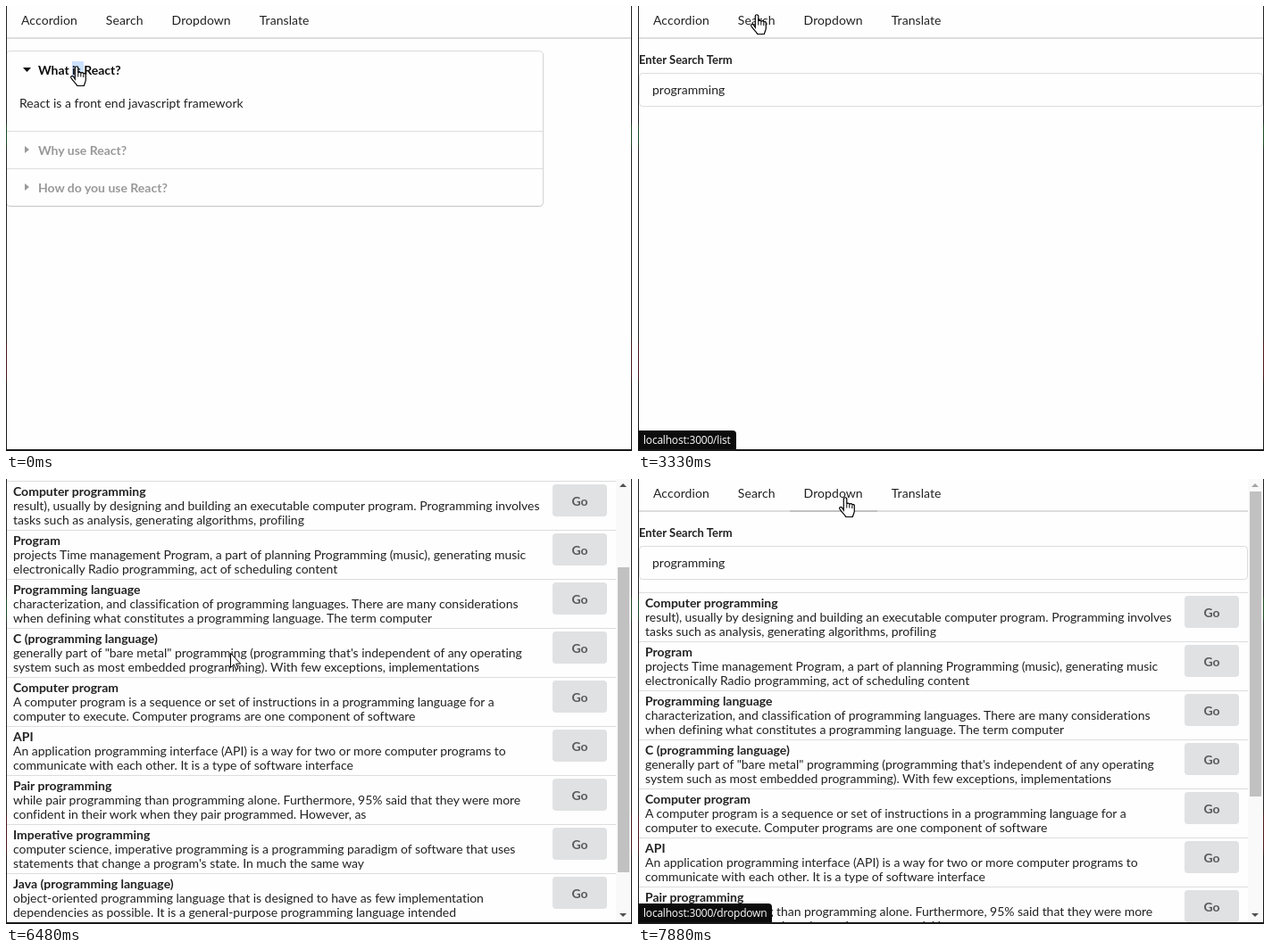
An HTML page for the animation above (8000 ms loop, 701 by 499 pixels).

```html
<!DOCTYPE html>
<html lang="en">
<head>
<meta charset="utf-8">
<title>React widgets</title>
<style>
  * { box-sizing: border-box; }
  html, body { margin: 0; width: 100%; height: 100%; overflow: hidden; }
  body {
    position: relative; color: rgba(0,0,0,.87); font: 14px/20px Lato, sans-serif;
    background: linear-gradient(#222 130px, #1d4a22 135px 155px, #222 162px 370px, #4a1a1a 380px 415px, #181818 425px);
  }
  #view { position: absolute; left: 1px; top: 0; width: 699px; height: 497px; overflow: hidden; background: #fefefe; }
  #page { position: absolute; inset: 0; }
  #page.narrow { right: 17px; }
  nav { position: absolute; top: -3px; width: 100%; height: 40px; display: flex; border-bottom: 2px solid rgba(34,36,38,.15); }
  nav a { height: 40px; padding: 12px 16px; line-height: 14px; letter-spacing: .08px; border-bottom: 2px solid transparent; }
  nav a.pressed { border-color: rgba(34,36,38,.15); }

  #accordion {
    position: absolute; top: 51px; width: 600px; border-radius: 4px;
    box-shadow: 0 1px 2px rgba(34,36,38,.15), 0 0 0 1px rgba(34,36,38,.15);
  }
  .title { position: relative; height: 42px; padding-left: 35px; border-top: 1px solid rgba(34,36,38,.15); font-weight: 700; line-height: 41px; color: rgba(0,0,0,.4); }
  .title:first-child { height: 41px; border: 0; }
  .title::before {
    content: ""; position: absolute; left: 20px; top: 16px; width: 5px; height: 8px;
    background: currentColor; clip-path: polygon(0 0, 100% 50%, 0 100%);
  }
  .title.hover { color: rgba(0,0,0,.87); }
  .title.open { color: rgba(0,0,0,.95); }
  .title.open::before { left: 18px; top: 18px; width: 9px; height: 5px; clip-path: polygon(0 0, 100% 0, 50% 100%); }
  .content { display: none; padding: 7px 14px 21px; }
  .open + .content { display: block; }
  #selection { position: absolute; left: 73px; top: 62px; width: 13px; height: 20px; background: #cce2ff; }

  #search label { position: absolute; top: 50px; font-size: 13px; font-weight: 700; }
  #input { position: absolute; top: 75px; width: 100%; height: 38px; padding: 8px 14px; border: 1px solid rgba(34,36,38,.15); border-radius: 4px; }
  #results { position: absolute; top: 127px; width: 100%; }
  .item {
    position: relative; height: 55px; padding: 3px 7px; border-top: 1px solid rgba(34,36,38,.15);
    line-height: 16px; letter-spacing: -.035px; white-space: pre;
  }
  .item b { letter-spacing: 0; }
  .item button {
    position: absolute; left: 611px; top: 3px; width: 61px; height: 36px; padding: 0; border: 0; border-radius: 4px;
    background: #e0e1e2; color: rgba(0,0,0,.6); font: 700 14px Lato, sans-serif;
  }

  #scrollbar { position: absolute; right: 0; top: 0; width: 17px; height: 497px; background: #f9f9f9; }
  #scrollbar * { position: absolute; }
  #thumb { left: 2px; width: 13px; height: 342px; background: #c1c1c1; }
  .arrow { left: 4px; width: 8px; height: 4px; background: #505050; }
  #up { top: 5px; clip-path: polygon(0 100%, 50% 0, 100% 100%); }
  #down { top: 487px; clip-path: polygon(0 0, 100% 0, 50% 100%); }

  #status {
    position: absolute; left: 0; bottom: 0; height: 21px; padding: 0 6px 0 5px; border-radius: 0 4px 0 0;
    background: #0c0c0c; color: #fff; font: 12px/21px "Open Sans", sans-serif; letter-spacing: -.2px;
  }
  #cursor { position: absolute; width: 20px; height: 25px; overflow: visible; fill: #fff; stroke: #000; }
</style>
</head>
<body>
<div id="view">
  <div id="page">
    <nav><a>Accordion</a><a>Search</a><a>Dropdown</a><a>Translate</a></nav>
    <div id="selection"></div>
    <div id="accordion"></div>
    <div id="search">
      <label>Enter Search Term</label>
      <div id="input">programming</div>
      <div id="results"></div>
    </div>
  </div>
  <div id="scrollbar"><i id="up" class="arrow"></i><i id="thumb"></i><i id="down" class="arrow"></i></div>
  <div id="status"></div>
</div>
<svg id="cursor">
  <g id="hand" transform="translate(-7.2)">
    <path d="M5.5 15V2.5a1.75 1.75 0 0 1 3.5 0v6a1.5 1.5 0 0 1 3 .3a1.5 1.5 0 0 1 3 .6a1.3 1.3 0 0 1 2.5 1V16c0 2-1.5 4-2 6.5H8C7 20 3 17 1 13.5C.2 12 2 10.8 3.5 12Z" stroke-width="1.2"/>
    <path d="M9 8.5v4M12 9v3.5M15 9.5V13" fill="none"/>
  </g>
  <path id="pointer" d="M.5.5v16L4.2 13l2.4 5.6 2.4-1-2.4-5.4h5.1Z"/>
</svg>

<script>
const $ = id => document.getElementById(id);

const questions = [
  ["What is React?", "React is a front end javascript framework"],
  ["Why use React?", "React is a favorite JS library among engineers"],
  ["How do you use React?", "You use React by creating a components"],
];
const results = [
  ["Computer programming", "result), usually by designing and building an executable computer program. Programming involves\ntasks such as analysis, generating algorithms, profiling"],
  ["Program", "projects Time management Program, a part of planning Programming (music), generating music\nelectronically Radio programming, act of scheduling content"],
  ["Programming language", "characterization, and classification of programming languages. There are many considerations\nwhen defining what constitutes a programming language. The term computer"],
  ["C (programming language)", "generally part of \"bare metal\" programming (programming that's independent of any operating\nsystem such as most embedded programming). With few exceptions, implementations"],
  ["Computer program", "A computer program is a sequence or set of instructions in a programming language for a\ncomputer to execute. Computer programs are one component of software"],
  ["API", "An application programming interface (API) is a way for two or more computer programs to\ncommunicate with each other. It is a type of software interface"],
  ["Pair programming", "while pair programming than programming alone. Furthermore, 95% said that they were more\nconfident in their work when they pair programmed. However, as"],
  ["Imperative programming", "computer science, imperative programming is a programming paradigm of software that uses\nstatements that change a program's state. In much the same way"],
  ["Java (programming language)", "object-oriented programming language that is designed to have as few implementation\ndependencies as possible. It is a general-purpose programming language intended"],
  ["Python (programming language)", "indentation. Its language constructs and object-oriented approach aim to help programmers\nwrite clear, logical code for small and large-scale projects"],
];
$("accordion").innerHTML = questions.map(([q, a]) => `<div class="title">${q}</div><div class="content">${a}</div>`).join("");
$("results").innerHTML = results.map(([name, text]) => `<div class="item"><b>${name}</b>\n${text}<button>Go</button></div>`).join("");
const titles = [...document.querySelectorAll(".title")];
const links = [...document.querySelectorAll("nav a")];

// Each move: first step time, last step time, number of steps, target
const cursorMoves = [
  [280, 530, 3, 78, 138], [670, 670, 1, 79, 174], [950, 1210, 3, 79, 162],
  [1360, 1740, 4, 82, 206], [2170, 2420, 3, 94, 104], [2550, 2670, 2, 130, 11],
  [2820, 3190, 4, 133, 9], [5330, 6080, 7, 190, 12], [6230, 6230, 1, 229, 205],
  [6350, 6850, 5, 283, 181], [7250, 7500, 3, 238, 34], [7620, 7740, 2, 232, 20],
];
const scrollMoves = [[6350, 6600, 3, 187], [6850, 6850, 1, 144], [6970, 7110, 2, 0]];
const statusMoves = [[2820, 3070, 3, 1], [6230, 6230, 1, .72], [6350, 6470, 2, 0], [7620, 7740, 2, 1]];

function track(moves, value, t) {
  for (const [start, end, count, ...target] of moves) {
    if (t < start) break;
    const gap = (end - start) / (count - 1) || 1;
    const step = Math.min(count, Math.floor((t - start) / gap + .01) + 1);
    value = value.map((v, i) => v + (target[i] - v) * step / count);
  }
  return value;
}

const show = (id, on) => $(id).style.display = on ? "" : "none";

function render(t) {
  const [x, y] = track(cursorMoves, [79, 67], t);
  const [scroll] = track(scrollMoves, [0], t);
  const [statusOpacity] = track(statusMoves, [0], t);
  const searching = t >= 3330, loaded = t >= 4460;
  const openIndex = t < 1360 ? 0 : t < 2020 ? 1 : 2;
  const pressed = t >= 7880 ? 2 : t >= 3190 && !searching ? 1 : -1;

  show("accordion", !searching);
  show("search", searching);
  show("results", loaded);
  show("scrollbar", loaded);
  show("selection", t < 950);
  $("page").className = loaded ? "narrow" : "";
  $("page").style.transform = `translateY(${-Math.round(scroll)}px)`;
  $("thumb").style.top = 14 + Math.round(scroll * .68) + "px";
  $("up").style.background = scroll ? "#505050" : "#a3a3a3";
  links.forEach((link, i) => link.classList.toggle("pressed", i === pressed));

  let overTitle = false;
  titles.forEach((title, i) => {
    const top = 51 + 42 * i + (i > openIndex ? 47 : -1);
    const hover = !searching && y >= top && y < top + 42;
    overTitle ||= hover;
    title.classList.toggle("open", i === openIndex);
    title.classList.toggle("hover", hover);
  });

  $("status").textContent = "localhost:3000/" + (t < 5825 ? "list" : "dropdown");
  $("status").style.opacity = statusOpacity;

  const hand = overTitle || y < 37;
  show("hand", hand);
  show("pointer", !hand);
  $("cursor").style.transform = `translate(${Math.round(x)}px, ${Math.round(y)}px)`;
}

function frame() {
  render(performance.now() % 8000);
  requestAnimationFrame(frame);
}
frame();
</script>
</body>
</html>
```
